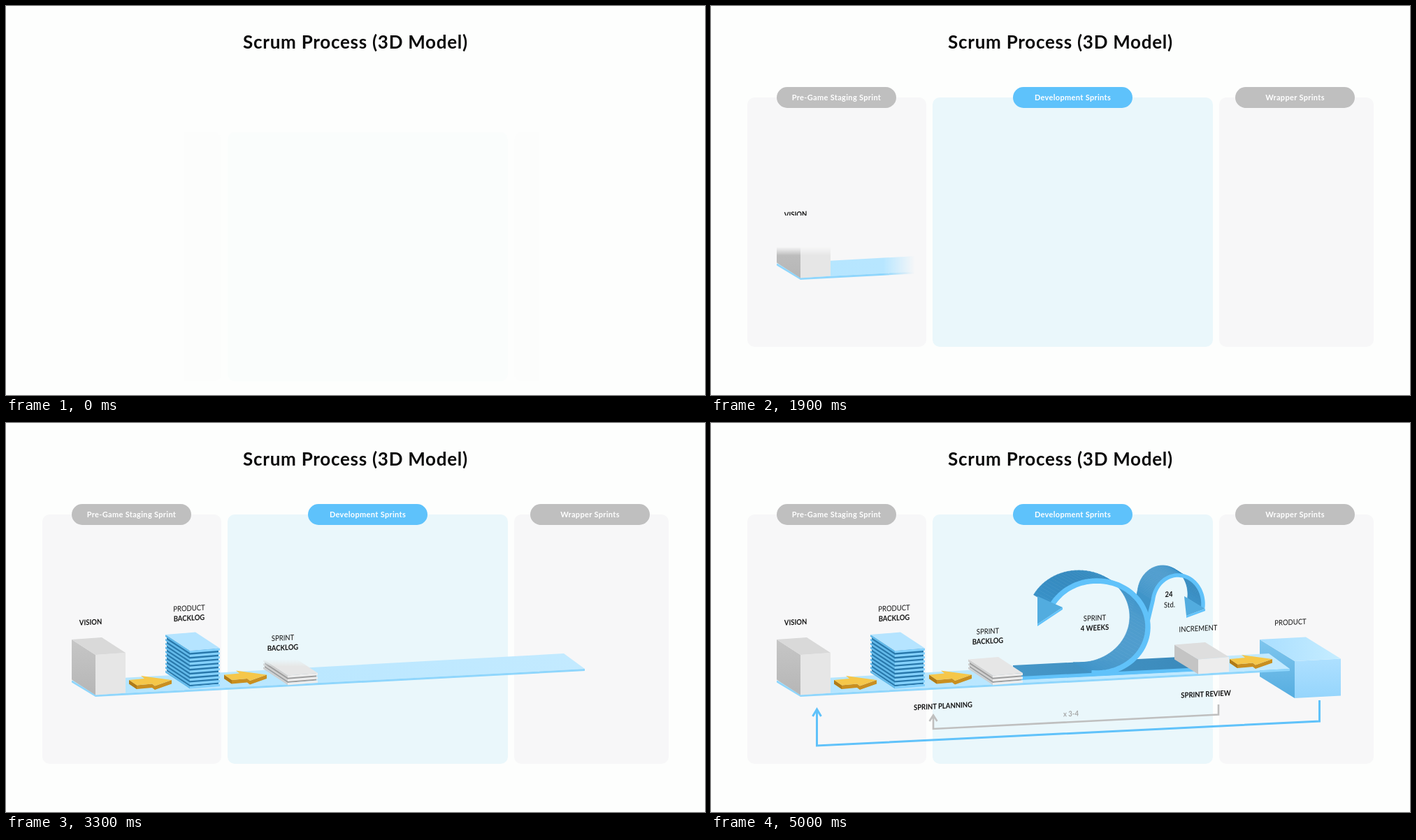
These frames come from a looping animation (1000x557 px, 5600 ms). An HTML page:

```html
<!DOCTYPE html>
<html lang="en">
<head>
<meta charset="utf-8">
<title>Scrum Process (3D Model)</title>
<style>
  html, body { margin: 0; height: 100%; overflow: hidden; background: #fdfefd; }
  svg { display: block; width: 100vw; height: 100vh; font-family: Lato, sans-serif; text-anchor: middle; }
</style>
</head>
<body>
<svg id="stage" viewBox="0 0 1000 557"></svg>
<script>
const LOOP = 5600, STEP = 100;
const EDGE = '#60c2fa';
const stage = document.getElementById('stage');

// Drawing helpers: each returns SVG markup
const poly = (pts, fill) => `<polygon points="${pts}" fill="${fill}"/>`;
const shift = (pts, dx, dy) => pts.map(([x, y]) => [x + dx, y + dy]);
const skirt = (pts, h, fill) => poly([...pts, ...shift(pts, 0, h).reverse()], fill);
const line = (d, color, width) =>
  `<path d="${d}" fill="none" stroke="${color}" stroke-width="${width}"/>`;
const label = (x, y, text, weight = 400, fill = '#111') =>
  `<text transform="matrix(.88 -.045 0 1 ${x} ${y + 4})" font-size="10.8" font-weight="${weight}" fill="${fill}">${text}</text>`;
const gradient = (id, from, to, dir) =>
  `<linearGradient id="${id}" x2="${dir === 'x' ? 1 : 0}" y2="${dir === 'y' ? 1 : 0}">
   <stop stop-color="${from}"/><stop offset="1" stop-color="${to}"/></linearGradient>`;

// Corners of a top face: back left, back right, front right, front left
const topFace = (x, y, [lx, ly], [fx, fy]) =>
  [[x, y], [x + fx, y + fy], [x + lx + fx, y + ly + fy], [x + lx, y + ly]];

function cuboid(x, y, side, front, h, [top, left, face]) {
  const [a, b, c, d] = topFace(x, y, side, front);
  return skirt([a, d], h, left) + skirt([d, c], h, face) + poly([a, b, c, d], top);
}

function sheets(x, y, count, gap, [top, left, face, dark]) {
  const [a, b, c, d] = topFace(x, y, [35, 23], [43, -3.5]);
  let art = skirt([[a[0] + 2, a[1] + 1], d, [c[0] - 2, c[1]]], gap * (count - 1), dark);
  for (let i = count - 1; i >= 0; i--) {
    art += skirt(shift([a, d], 0, i * gap), 3.1, left) + skirt(shift([d, c], 0, i * gap), 3.3, face);
  }
  return art + poly([a, b, c, d], top);
}

function arrow(dx, dy) {
  const front = shift([[176, 368], [187, 375.5], [209, 373.5], [213, 376.5], [237, 368]], dx, dy);
  const back = shift([[193, 362], [198, 366]], dx, dy);
  return skirt(front, 5.5, '#c98f20') + skirt(front.slice(0, 2), 5.5, '#b07b18') +
    poly([...front, ...back], '#f5c74a');
}

function arc(cx, cy, rx, ry, from, to) {
  const count = 60;
  return Array.from({ length: count + 1 }, (_, i) => {
    const a = (from + (to - from) * i / count) * Math.PI / 180;
    return [cx + rx * Math.cos(a), cy + ry * Math.sin(a)];
  });
}

// Surface swept along the depth axis behind a bright front edge
function ribbon(edge, dx, dy, width) {
  const surface = edge.slice(1).map((p, i) => {
    const q = edge[i], tone = 52 + 4 * Math.sin(i / edge.length * 6);
    const fill = `hsl(203 56% ${tone.toFixed(1)}%)`;
    const quad = [q, p, [p[0] + dx, p[1] + dy], [q[0] + dx, q[1] + dy]];
    return `<polygon points="${quad}" fill="${fill}" stroke="${fill}" stroke-width=".6"/>`;
  });
  return surface.join('') + line('M' + edge.join('L'), EDGE, width);
}

const arrowHead = (back, front, tip) => poly([back, front, tip], '#52acdf') + skirt([tip, front], 3, EDGE);

// Parts in drawing order, each with its own way of appearing
const parts = [];
let defs = gradient('frontBlue', '#aee0ff', '#95d5fc', 'y') + gradient('leftBlue', '#7fc6ee', '#56ade0', 'y') +
  gradient('topBlue', '#a9deff', '#c6edff', 'x') + gradient('leftGrey', '#c6c6c6', '#b6b6b6', 'y') +
  gradient('strip', '#b4e5ff', '#c3eaff', 'x') + gradient('tail', '#4697c8', '#3b8abb', 'x');

const add = (start, end, art, set, attrs = '') => parts.push({ start, end, art, set, attrs });

// Soft-edged reveal; `from` and `to` are the positions of the leading edge
function wipe(start, end, axis, from, to, soft, art) {
  const id = parts.length, back = soft * Math.sign(from - to);
  defs += `<linearGradient id="g${id}" gradientUnits="userSpaceOnUse" x1="0" x2="0" y1="0" y2="0">
    <stop stop-color="#fff"/><stop offset="1" stop-color="#000"/></linearGradient>
    <mask id="m${id}" maskUnits="userSpaceOnUse" x="0" y="0" width="1000" height="557">
    <rect width="1000" height="557" fill="url(#g${id})"/></mask>`;
  add(start, end, art, (node, p) => {
    const edge = from + (to - from) * p, fade = document.getElementById('g' + id);
    fade.setAttribute(axis + 1, edge + back);
    fade.setAttribute(axis + 2, edge);
    if (p < 1) node.setAttribute('mask', `url(#m${id})`);
    else node.removeAttribute('mask');
  });
}

// Slides into place from behind a hard edge: upwards (y) or to the right (x)
function peek(start, end, axis, edge, distance, art) {
  const id = parts.length;
  const rect = axis === 'y' ? `width="1000" height="${edge}"` : `x="${edge}" width="1000" height="557"`;
  defs += `<clipPath id="c${id}"><rect ${rect}/></clipPath>`;
  add(start, end, `<g>${art}</g>`, (node, p) => {
    const off = distance * (1 - p);
    node.firstElementChild.setAttribute('transform',
      axis === 'y' ? `translate(0 ${off})` : `translate(${-off} 0)`);
  }, `clip-path="url(#c${id})"`);
}

// Panels wait as a faint trace, then float up
const panel = (x, w, fill) => `<rect x="${x}" y="131" width="${w}" height="357" rx="10" fill="${fill}"/>`;
add(-600, 600, panel(52, 256, '#f7f7f8') + panel(317, 401, '#eaf7fb') + panel(727, 221, '#f7f7f8'),
  (node, p) => {
    const rise = Math.max(.1, 4 * p - 3);
    node.setAttribute('opacity', rise);
    node.setAttribute('transform', `translate(0 ${55 * (1 - rise)})`);
  });

for (const [x, text, fill] of [
  [179.5, 'Pre-Game Staging Sprint', '#bfbfbf'],
  [517.5, 'Development Sprints', '#5ec2fb'],
  [835.5, 'Wrapper Sprints', '#bfbfbf'],
]) {
  add(1020, 1520, `<rect x="-85.5" y="-15" width="171" height="30" rx="15" fill="${fill}"/>
    <text y="4" font-size="11" font-weight="700" letter-spacing=".33" fill="#fff">${text}</text>`,
    (node, p) => node.setAttribute('transform', `translate(${x} 131) scale(${p})`));
}

wipe(4020, 4400, 'y', 394, 300, 12,
  cuboid(785, 310, [50, 31], [66, -3.5], 53, ['url(#topBlue)', 'url(#leftBlue)', 'url(#frontBlue)']));

wipe(1520, 3020, 'x', 94, 874, 45,
  poly([[94, 369], [798, 330], [828, 352], [128, 389]], 'url(#strip)') +
  skirt([[94, 368.5], [128, 389], [828, 352]], 3, '#8fd6fc'));

wipe(3780, 4220, 'x', 430, 720, 40,
  poly([[432, 347], [690, 334], [692, 355], [432, 368]], 'url(#tail)') +
  line('M432 366 L692 353', EDGE, 5));

wipe(3320, 4070, 'y', 200, 380, 20,
  ribbon([[625, 284], ...arc(668, 259, 36, 41, 188, 368)], -22, -14, 5.5) +
  arrowHead([677, 248], [707, 266], [680, 276]) +
  ribbon(arc(552, 292, 73, 66, 96, -152), -26, -15, 7.5) +
  arrowHead([467, 248], [503, 264], [467, 288]));

wipe(1620, 2120, 'y', 391, 309, 12,
  cuboid(94, 310, [34, 22], [43, -3], 57.5, ['#d9d9d9', 'url(#leftGrey)', '#e6e6e6']));
peek(1620, 2120, 'y', 300, 30, label(121, 285, 'VISION', 700));

peek(2120, 2400, 'x', 172, 61, arrow(0, 0));
wipe(2200, 2700, 'y', 383, 290, 12,
  sheets(228, 303, 10, 5.7, ['#b5e4ff', '#63baea', '#84d1fc', '#2878ab']));
peek(2200, 2700, 'y', 294, 38, label(262, 265, 'PRODUCT') + label(262, 279, 'BACKLOG', 700));

peek(2650, 3020, 'x', 307, 61, arrow(136, -7.5));
wipe(3000, 3400, 'y', 376, 326, 10,
  sheets(368, 338.5, 3, 5.2, ['#e6e6e6', '#cfcfcf', '#ededed', '#9c9c9c']));
peek(3000, 3400, 'y', 326, 38, label(396, 298, 'SPRINT') + label(396, 312, 'BACKLOG', 700));

peek(3300, 3700, 'y', 306, 38, label(549, 279, 'SPRINT') + label(549, 293, '4 WEEKS', 700));
peek(3300, 3700, 'y', 273, 38, label(655, 245, '24', 700) + label(656, 260, 'Std.'));

wipe(3520, 4020, 'y', 359, 293, 9,
  cuboid(663, 317.5, [34, 21], [44, -3.5], 21, ['#dedede', '#c4c4c4', '#ededed']));
peek(3520, 4020, 'y', 309, 23, label(697, 294, 'INCREMENT'));

peek(4020, 4350, 'x', 742, 61, arrow(566, -30));
peek(4020, 4400, 'y', 300, 24, label(829, 285, 'PRODUCT'));

wipe(4400, 4750, 'y', 397, 480, 12,
  line('M870.5 397 V427 L151.5 462 V411 M145.5 420 L151.5 410 L157.5 420', EDGE, 3));
wipe(4520, 4920, 'y', 403, 452, 10,
  line('M726 403 V417.5 L318 438 V420 M312.5 427 L318 418.5 L323.5 427', '#bfbfbf', 2.6));
peek(4620, 5000, 'y', 418, 26, label(332, 405, 'SPRINT PLANNING', 700));
peek(4620, 5000, 'y', 402, 26, label(708, 388, 'SPRINT REVIEW', 700));
peek(4620, 5000, 'y', 428, 24, label(515, 416, 'x 3-4', 700, '#a6a6a6'));

stage.innerHTML = `<defs>${defs}</defs>
  <text x="500" y="60.5" font-size="26" font-weight="700" letter-spacing=".73" fill="#0a0a0a">Scrum Process (3D Model)</text>` +
  parts.map(part => `<g class="part" ${part.attrs}>${part.art}</g>`).join('');
const nodes = stage.querySelectorAll('.part');

function draw(now) {
  const t = Math.floor(now % LOOP / STEP) * STEP;
  parts.forEach(({ start, end, set }, i) => {
    const p = Math.min(1, Math.max(0, (t - start) / (end - start)));
    nodes[i].style.display = p ? '' : 'none';
    if (p) set(nodes[i], p);
  });
}

function tick() {
  draw(performance.now());
  requestAnimationFrame(tick);
}
tick();
</script>
</body>
</html>
```
